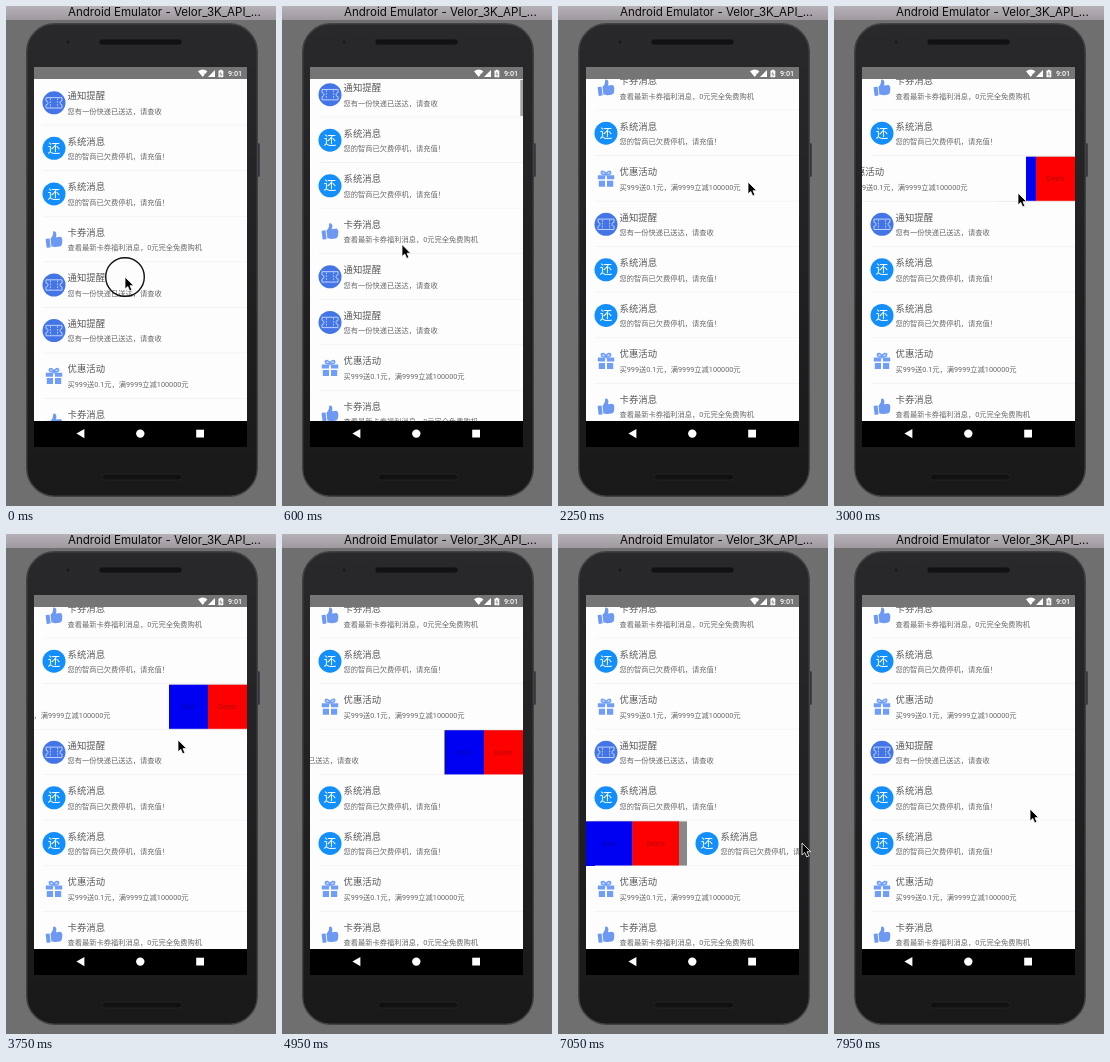
Recreate the animation shown at these times as an HTML page. Size 270 px wide and 500 px high, loop 8 s.

```html
<!DOCTYPE html>
<html lang="zh-CN">
<head>
<meta charset="utf-8">
<title>List swipe demo</title>
<style>
  html, body { margin: 0; width: 100%; height: 100%; overflow: hidden; background: #6f6f6f; }
  svg { display: block; width: 100vw; height: 100vh; }
  .bar { font: 11.55px Inter, Roboto, sans-serif; fill: #0c0c0c; }
  .clock { font: 500 7.2px Roboto, sans-serif; fill: #fff; }
  .title, .sub, .glyph { font: 9.4px Roboto, "Noto Sans CJK SC", "Noto Sans CJK", sans-serif; fill: #5a5a5a; }
  .sub { font-size: 7.25px; fill: #686868; }
  .glyph { font-size: 12.5px; fill: #fff; text-anchor: middle; }
  .label { font: 6.5px Roboto, sans-serif; text-anchor: middle; }
</style>
</head>
<body>
<svg viewBox="0 0 270 500" preserveAspectRatio="none">
  <defs>
    <linearGradient id="shell" x2="0" y2="1">
      <stop offset="0" stop-color="#29282b"/>
      <stop offset="1" stop-color="#19191a"/>
    </linearGradient>
    <linearGradient id="chrome" x2="0" y2="1">
      <stop offset="0" stop-color="#b6b1b6"/>
      <stop offset="1" stop-color="#9f9aa0"/>
    </linearGradient>
    <clipPath id="view"><path d="M28 73h213v342H28z"/></clipPath>

    <g id="ticket">
      <circle r="11.5" fill="#4375e6"/>
      <g fill="none" stroke="#bdd0fb">
        <path d="M-8 -5.2H8V-2a2 2 0 0 0 0 4V5.2H-8V2a2 2 0 0 0 0 -4z"/>
        <path d="M-3.6 -4.4V5M3.6 -4.4V5" stroke-dasharray="1.6 1.3"/>
      </g>
    </g>
    <g id="system">
      <circle r="11.5" fill="#138ffb"/>
      <text class="glyph" y="4.6">还</text>
    </g>
    <g id="thumb" fill="#6d99f3" transform="rotate(-7)">
      <rect x="-8.3" y="-1.6" width="4" height="9" rx=".7"/>
      <path d="M-3.4 -1.2C-1.4 -2.6 -.2 -4.6 0 -7.2C.1 -8.6 2.9 -8.4 3 -5.4C3 -4 2.6 -3 2.2 -1.9H7Q9 0 7.8 3.5Q7.4 7.7 4.4 7.7H.6C-1 7.7 -2 6.9 -3.4 6.6z"/>
    </g>
    <g id="gift" fill="#6f9df8">
      <path d="M-8.2 -3.4H-1V.6H-8.2zM1 -3.4H8.2V.6H1zM-7.2 2H-1V8H-7.2zM1 2H7.2V8H1z"/>
      <path d="M0 -4.2C-1 -7.6 -4.6 -8.4 -4.6 -6C-4.6 -4.4 -2 -4.2 0 -4.2C2 -4.2 4.6 -4.4 4.6 -6C4.6 -8.4 1 -7.6 0 -4.2z" fill="none" stroke="#6f9df8" stroke-width="1.7"/>
    </g>
  </defs>

  <path d="M0 0h270v500H0z" fill="#6f6f6f"/>
  <path d="M0 0h270v14H0z" fill="url(#chrome)"/>
  <text class="bar" x="62" y="10.3">Android Emulator - Velor_3K_API_...</text>

  <rect x="250" y="137" width="3.8" height="34" rx="1.5" fill="#38363a"/>
  <rect x="20.7" y="17.7" width="230.6" height="472.6" rx="28" fill="url(#shell)" stroke="#434146" stroke-width="1.4"/>
  <circle cx="62" cy="36" r="2.2" fill="#1a1a1c" stroke="#343337" stroke-width=".6"/>
  <g fill="#111112" stroke="#2c2b2e" stroke-width=".6">
    <rect x="93" y="33" width="83" height="6" rx="3"/>
    <rect x="96" y="468" width="80" height="6" rx="3"/>
  </g>

  <path d="M28 61h213v12H28z" fill="#757575"/>
  <g fill="#fff">
    <path d="M192 65.2Q196.7 61.8 201.4 65.2L196.7 71z"/>
    <path d="M209 64v7h-7z"/>
    <path d="M212.5 64.6h1.4v-.9h2v.9h1.4v6.7h-4.8z"/>
  </g>
  <path d="M215.2 65.7l-1.4 2.5h2.2l-1.4 2.2M198 67.5l3 3m0 -3l-3 3" fill="none" stroke="#757575" stroke-width=".7"/>
  <text class="clock" x="222" y="70">9:01</text>

  <g clip-path="url(#view)">
    <path d="M28 73h213v342H28z" fill="#fdfdfd"/>
    <g id="list"></g>
    <rect id="scrollbar" x="238.3" width="2.7" height="36" fill="#a3a3a3"/>
  </g>

  <path d="M28 415h213v26H28z" fill="#000"/>
  <g fill="#fff">
    <path d="M70.4 427.6l8 -4.6v9.2z"/>
    <circle cx="134.3" cy="427.6" r="4.2"/>
    <path d="M190.2 423.7h7.8v7.8h-7.8z"/>
  </g>

  <g id="cursor">
    <circle id="ring" r="19.3" fill="none" stroke="#111" stroke-width="1.4"/>
    <path d="M0 0V12L2.8 9.5L4.7 13.9L6.9 13L5 8.7H8.7z" fill="#000" stroke="#fff" stroke-width=".8"/>
  </g>
</svg>

<script>
const LOOP = 8000, STEP = 150, ROW = 45.55, TOP = 74;
const DRAG = 600, SETTLE = 300;
const $ = id => document.getElementById(id);

const kinds = {
  T: ['ticket', '通知提醒', '您有一份快递已送达，请查收'],
  X: ['system', '系统消息', '您的智商已欠费停机，请充值！'],
  K: ['thumb', '卡券消息', '查看最新卡券福利消息，0元完全免费购机'],
  Y: ['gift', '优惠活动', '买999送0.1元，满9999立减100000元']
};

const action = (x, w, fill, ink, text) =>
  `<rect x="${x}" y=".8" width="${w}" height="44.6" fill="${fill}"/>
   <text class="label" x="${x + w / 2}" y="25" fill="${ink}">${text}</text>`;
const pair = (side, x, w) => `<g class="${side}">` +
  action(x, w, '#0000f2', '#0000b4', 'More') +
  action(x + w, w, '#ff0000', '#b80000', 'Delete') + '</g>';

function row(kind, i) {
  const [icon, title, sub] = kinds[kind];
  return `<g transform="translate(0 ${TOP + i * ROW})">
    <g class="under" visibility="hidden">
      <rect x="28" y=".8" width="213" height="44.6" fill="#888"/>
      ${pair('left', 28, 46.5)}${pair('right', 163, 39)}
    </g>
    <g class="front">
      <rect x="28" width="213" height="${ROW}" fill="#fdfdfd"/>
      <use href="#${icon}" x="48" y="22.8"/>
      <text class="title" x="61.5" y="19.2">${title}</text>
      <text class="sub" x="61.5" y="33.7">${sub}</text>
    </g>
    <path d="M37 45.3H241" stroke="#ececec" stroke-width=".8"/>
  </g>`;
}
$('list').innerHTML = [...'TXXKTTYKXYTXXYK'].map(row).join('');

const clamp = (v, lo, hi) => Math.min(hi, Math.max(lo, v));
const mix = (a, b, u) => a + (b - a) * u;
const span = (t, start, length) => clamp((t - start) / length, 0, 1);
const easeIn = u => u ** 3;
const easeOut = u => 1 - (1 - u) ** 2;
const smooth = u => u * u * (3 - 2 * u);

// A row follows the pointer up to its limit, springs to its open width, then closes.
const swipes = [
  { row: 9, press: 2700, close: 4350, from: 233, to: 135, y: 187 },
  { row: 10, press: 4350, close: 5700, from: 229, to: -14, y: 235 },
  { row: 12, press: 6450, close: 7500, from: 143, to: 244, y: 309 }
];

function offset({ press, close, from, to }, t) {
  const [limit, open] = to < from ? [-79, -78] : [101, 93];
  const pull = clamp((to - from) * smooth(span(t, press, DRAG)), -79, 101);
  const spring = (open - limit) * easeOut(span(t, press + DRAG, SETTLE));
  return (pull + spring) * (1 - easeOut(span(t, close, SETTLE)));
}

const at = (t, x, y) => ({ t, x, y });
const path = [
  at(300, 119, 271), at(900, 121, 206), at(1650, 121, 206), at(2250, 190, 176),
  ...swipes.flatMap(s => [at(s.press, s.from, s.y), at(s.press + DRAG, s.to, s.y)]),
  at(7500, 248, 309), at(7950, 196, 275)
];

function pointer(t) {
  const next = path.findIndex(p => p.t > t);
  if (next < 1) return next ? path[path.length - 1] : path[0];
  const a = path[next - 1], b = path[next];
  const u = smooth(span(t, a.t, b.t - a.t));
  return at(t, mix(a.x, b.x, u), mix(a.y, b.y, u));
}

const presses = [0, ...swipes.map(s => s.press)];
const scrollTop = t => 65 * easeIn(span(t, 300, 600)) + 269 * easeOut(span(t, 900, 1065));

const parts = swipes.map(swipe => {
  const el = $('list').children[swipe.row], find = name => el.querySelector('.' + name);
  return { swipe, under: find('under'), front: find('front'), left: find('left'), right: find('right') };
});
const show = (el, on) => el.setAttribute('visibility', on ? 'visible' : 'hidden');
const move = (el, x, y) => el.setAttribute('transform', `translate(${x.toFixed(2)} ${y.toFixed(2)})`);

function draw(t) {
  const top = scrollTop(t);
  move($('list'), 0, -top);
  $('scrollbar').setAttribute('y', 73 + top * 0.107);
  $('scrollbar').setAttribute('opacity', span(t, 300, 150) - span(t, 1950, 250));
  for (const p of parts) {
    const dx = offset(p.swipe, t);
    move(p.front, dx, 0);
    show(p.under, dx !== 0);
    show(p.left, dx > 0);
    show(p.right, dx < 0);
  }
  const { x, y } = pointer(t);
  move($('cursor'), x, y);
  show($('ring'), presses.some(p => t >= p && t < p + 300));
}

const start = performance.now();
function tick() {
  const t = (performance.now() - start) % LOOP;
  draw(Math.floor(t / STEP) * STEP);
  requestAnimationFrame(tick);
}
draw(0);
requestAnimationFrame(tick);
</script>
</body>
</html>
```
